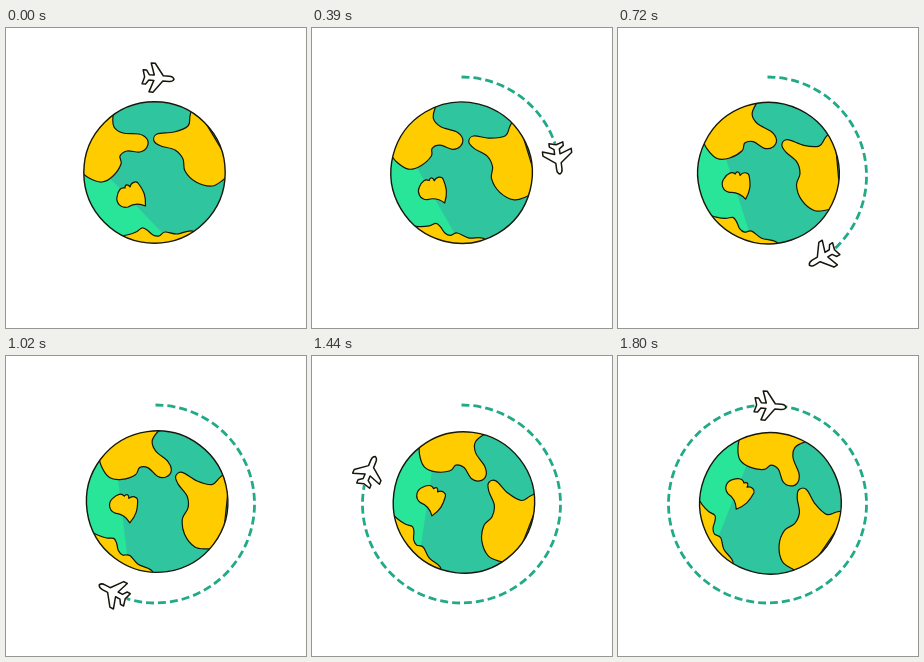
Write an HTML page with a canvas that moves like this. It is 300 px wide and 300 px high and loops after 1860 ms.

```html
<!DOCTYPE html>
<html>
<head>
<meta charset="utf-8">
<style>
  html, body { margin: 0; width: 100%; height: 100%; overflow: hidden; background: #fff; }
  canvas { display: block; }
</style>
</head>
<body>
<canvas id="stage" width="300" height="300"></canvas>
<script>
const ctx = document.getElementById('stage').getContext('2d');
const LOOP = 1860, TRAVEL = 1800, STEP = 30;
const ORBIT = { x: 149.5, y: 148, r: 99 };
const GLOBE = { x: 148.5, y: 144.5, r: 70.7 };
const PIVOT = { x: 148.2, y: 149 };
const INK = '#16160c';
const rad = deg => deg * Math.PI / 180;

// Smooth open curve through x,y pairs, closed by a straight line.
function smooth(text) {
  const n = text.split(/[ ,]+/).map(Number), pts = [];
  for (let i = 0; i < n.length; i += 2) pts.push([n[i], n[i + 1]]);
  const at = i => pts[Math.max(0, Math.min(pts.length - 1, i))];
  const path = new Path2D();
  path.moveTo(...pts[0]);
  for (let i = 0; i < pts.length - 1; i++) {
    const [a, b, c, d] = [at(i - 1), at(i), at(i + 1), at(i + 2)];
    path.bezierCurveTo(b[0] + (c[0] - a[0]) / 6, b[1] + (c[1] - a[1]) / 6,
                       c[0] - (d[0] - b[0]) / 6, c[1] - (d[1] - b[1]) / 6, ...c);
  }
  path.closePath();
  return path;
}

const lands = [
  smooth('60,75 110,77 107,88 108,99 117,105 133,106 141,111 141,119 134,124 121,123 114,128 115,136 107,148 96,154 83,150 70,140'),
  smooth('187,74 184,88 182,98 168,104 151,106 148,113 155,118 169,122 177,131 179,143 190,154 206,158 217,152 228,142'),
  smooth('108,209 121,207 130,204 136,200 141,202 147,207 153,208 159,204 171,206 188,204 190,230 108,230'),
  new Path2D('M139.5 178 Q130 174 122 179 C114 181 110 174 111 169 C112 162 115 159 119 160 C119 156 122 156 124 159 C125 154 130 153 132 155 C138 163 140 168 139.5 178Z')
];
const disc = new Path2D();
disc.arc(GLOBE.x, GLOBE.y, GLOBE.r, 0, 2 * Math.PI);
const lightSide = new Path2D('M60 104 L95 141 L165 214 L60 230Z');
const plane = new Path2D('M16 0 Q15 -2.7 11 -2.7 L5 -2.7 L-4 -14.5 L-8 -14.5 L-4 -2.7 L-9 -2.7 L-12 -7 L-15.5 -7 L-13.5 0 L-15.5 7 L-12 7 L-9 2.7 L-4 2.7 L-8 14.5 L-4 14.5 L5 2.7 L11 2.7 Q15 2.7 16 0Z');

function paint(path, fill, width) {
  ctx.fillStyle = fill;
  ctx.fill(path);
  if (!width) return;
  ctx.strokeStyle = INK;
  ctx.lineWidth = width;
  ctx.stroke(path);
}

function drawGlobe(angle) {
  ctx.save();
  ctx.translate(PIVOT.x, PIVOT.y);
  ctx.rotate(rad(angle));
  ctx.translate(-PIVOT.x, -PIVOT.y);
  ctx.save();
  ctx.clip(disc);
  paint(disc, '#2fc69f');
  paint(lightSide, '#28e59a');
  for (const land of lands) paint(land, '#ffcc00', 1.2);
  ctx.restore();
  ctx.strokeStyle = INK;
  ctx.lineWidth = 1.4;
  ctx.stroke(disc);
  ctx.restore();
}

function drawTrail(end) {
  if (end <= 0) return;
  ctx.beginPath();
  ctx.arc(ORBIT.x, ORBIT.y, ORBIT.r, rad(-90), rad(end - 90));
  ctx.setLineDash([8, 4]);
  ctx.strokeStyle = '#22aa86';
  ctx.lineWidth = 2.8;
  ctx.stroke();
  ctx.setLineDash([]);
}

function drawPlane(angle) {
  ctx.save();
  ctx.translate(ORBIT.x, ORBIT.y);
  ctx.rotate(rad(angle));
  ctx.translate(0, 1 - ORBIT.r);
  ctx.rotate(rad(3));
  paint(plane, '#fff', 1.5);
  ctx.restore();
}

function draw(now) {
  const t = Math.min(TRAVEL, Math.floor(now % LOOP / STEP) * STEP);
  const turn = 360 * t / TRAVEL;
  ctx.clearRect(0, 0, 300, 300);
  drawGlobe(65.3 * t / TRAVEL);
  drawTrail(turn - 7);
  drawPlane(turn + 1.5);
  requestAnimationFrame(draw);
}

ctx.lineJoin = 'round';
const start = performance.now();
draw(0);
function draw0() {}
</script>
</body>
</html>
```
